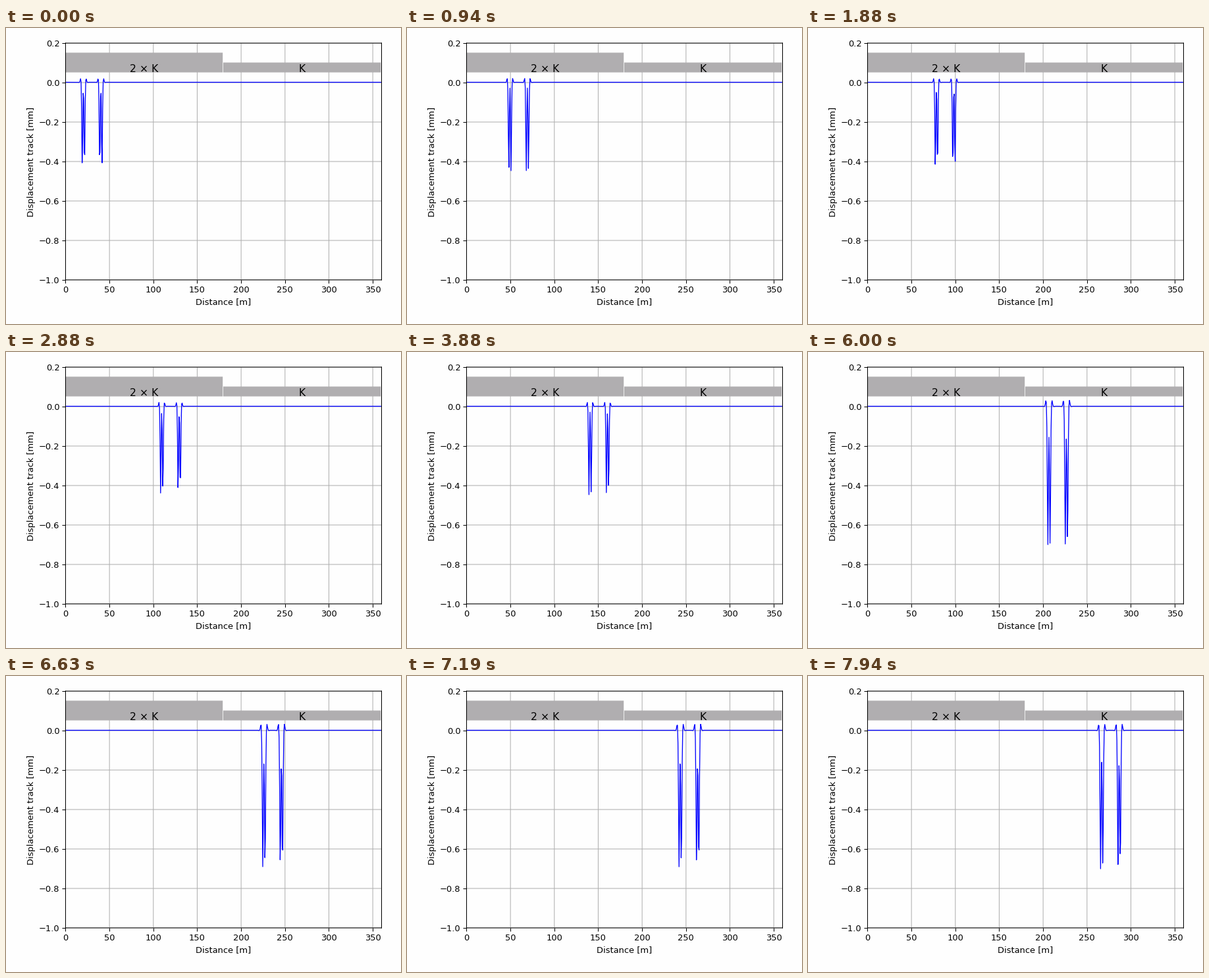
A matplotlib script for the animation above (8000 ms loop, 600 by 450 pixels).

```python
import numpy as np
import matplotlib.pyplot as plt
from matplotlib.animation import FuncAnimation
from matplotlib.patches import Rectangle
from matplotlib.transforms import ScaledTranslation

FRAMES = 128
LOOP_MS = 8000
WIDTH, HEIGHT, DPI = 600, 450, 93.75
NUDGE = 0.47                  # frame and grid sit this many pixels right and down
PAPER = "#fefefe"

EDGE = 179.7                  # where the support stiffness changes
STIFF, SOFT = 1.73, 1.48      # inverse bending lengths of the rail, 1/m
DEPTH = 0.728                 # dip under one axle on the soft side, mm
AXLES = (0.0, 2.5, 19.9, 22.4)

nodes = np.arange(600) * 0.6

# rear axle position at a few moments, near-constant speed
KEY_FRAMES = (0, 30, 62, 78, 96, 115, 127)
KEY_POS = (19.4, 77.58, 139.8, 170.61, 205.77, 242.5, 265.84)


def wave(c, beta, d, n=0):
    """n-th derivative of a decaying bending wave."""
    lam = beta * (-1 + 1j)
    return c * lam ** n * np.exp(lam * d)


def dip(x0):
    """Rail deflection under one axle on a two-part elastic bed."""
    side = 1 if x0 < EDGE else -1
    own, other = (STIFF, SOFT) if side > 0 else (SOFT, STIFF)
    load = (1 - 1j) * DEPTH * (SOFT / own) ** 3
    gap = abs(EDGE - x0)

    # match deflection, slope, moment and shear at the joint
    rows, rhs = [], []
    for n in range(4):
        back = (-1) ** n * wave(1, own, 0, n)
        on = wave(1, other, 0, n)
        rows.append([back.real, -back.imag, -on.real, on.imag])
        rhs.append(-wave(load, own, gap, n).real)
    p, q, r, s = np.linalg.solve(rows, rhs)

    across = side * (nodes - EDGE)
    far = np.abs(across)
    near = wave(load, own, np.abs(nodes - x0)) + wave(p + 1j * q, own, far)
    beyond = wave(r + 1j * s, other, far)
    return -np.where(across < 0, near.real, beyond.real)


def track(frame):
    rear = np.interp(frame, KEY_FRAMES, KEY_POS)
    return sum(dip(rear + a) for a in AXLES)


plt.rcParams["font.family"] = "DejaVu Sans"
fig, ax = plt.subplots(figsize=(WIDTH / DPI, HEIGHT / DPI), dpi=DPI,
                       facecolor=PAPER)
dx, dy = NUDGE / WIDTH, NUDGE / HEIGHT
fig.subplots_adjust(left=0.15 + dx, right=0.95 + dx,
                    bottom=0.15 - dy, top=0.95 - dy)

ax.set_facecolor(PAPER)
ax.set_xlim(0, 360)
ax.set_ylim(-1, 0.2)
ax.set_xticks(range(0, 351, 50))
ax.grid(True)
ax.set_xlabel("Distance [m]")
ax.set_ylabel("Displacement track [mm]")

rules = list(ax.spines.values())
for axis in (ax.xaxis, ax.yaxis):
    rules += axis.get_gridlines() + axis.get_ticklines()
for rule in rules:
    rule.set_snap(False)

# the data itself is not nudged
data = ax.transData + ScaledTranslation(-NUDGE / DPI, NUDGE / DPI,
                                        fig.dpi_scale_trans)

for x, height, label in ((0, 0.10, "2 × K"), (180, 0.05, "K")):
    ax.add_patch(Rectangle((x, 0.05), 179.4, height, lw=0, snap=False,
                           color="#b0aeb0", zorder=2, transform=data))
    ax.text(x + 90, 0.0525, label, fontsize=12, ha="center",
            va="baseline", transform=data)

line, = ax.plot(nodes, track(0), color="b", lw=1, zorder=2.5, transform=data)


def update(frame):
    line.set_ydata(track(frame))
    return line,


anim = FuncAnimation(fig, update, frames=FRAMES, interval=LOOP_MS / FRAMES,
                     repeat=True, repeat_delay=0)
plt.show()
```
